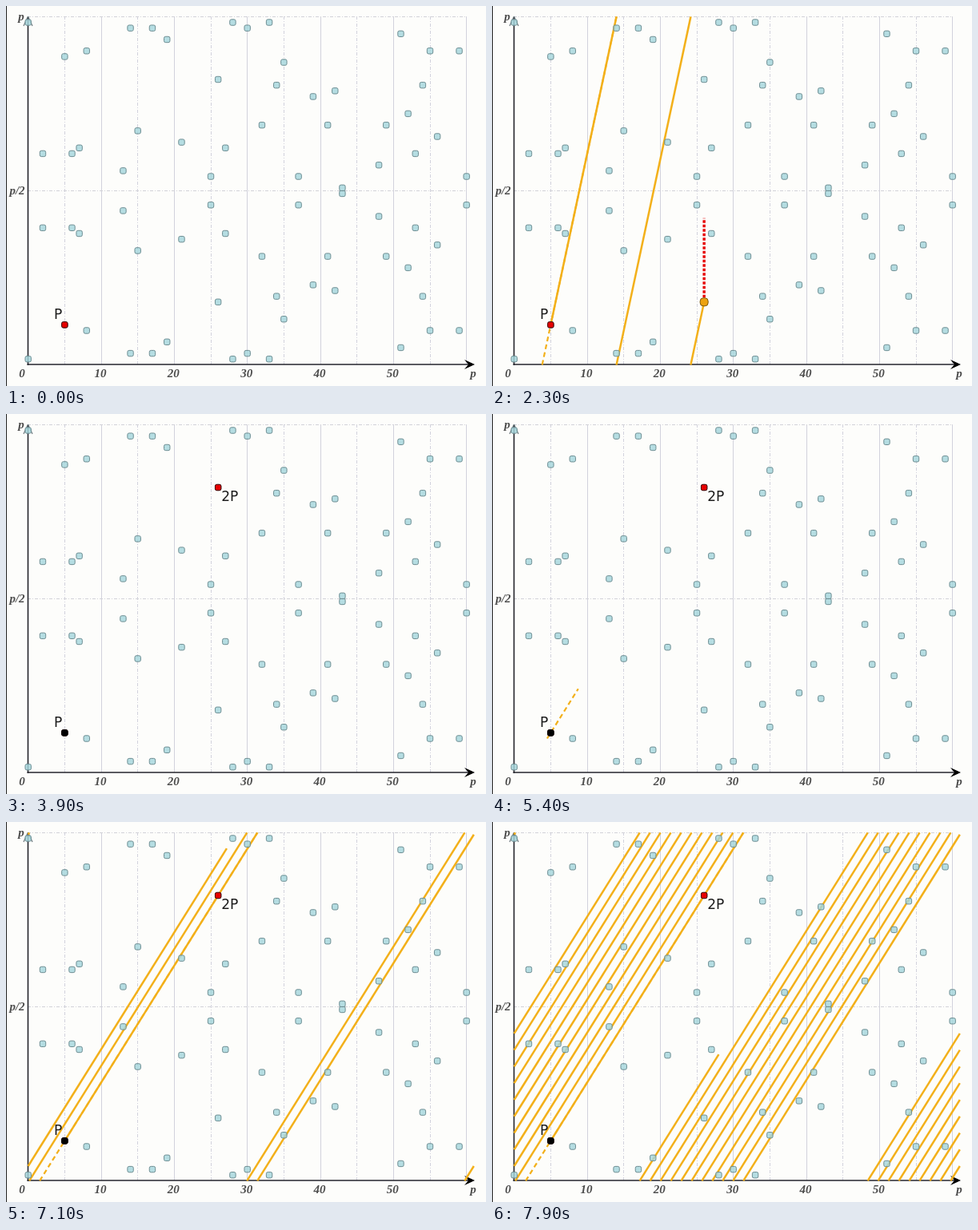
Recreate the animation shown at these times as an HTML page with a canvas. Size 600 px wide and 476 px high, loop 8 s.

```html
<!DOCTYPE html>
<html lang="en">
<head>
<meta charset="utf-8">
<title>Point addition on a curve modulo 61</title>
<style>
  html, body { margin: 0; width: 100%; height: 100%; overflow: hidden; background: #fdfdfb; }
  canvas { display: block; }
</style>
</head>
<body>
<canvas id="stage" width="600" height="476"></canvas>
<script>
const ctx = document.getElementById('stage').getContext('2d');
const MOD = 61, LOOP = 8000;
const ORANGE = '#f3b01a', RED = '#e60000';
const px = x => 27.7 + x * 9.133;
const py = y => 449.4 - y * 7.148;
const clamp = v => Math.max(0, Math.min(1, v));

// Every solution of y² = x³ + 9x + 1 modulo 61.
const points = [];
for (let x = 0; x < MOD; x++)
  for (let y = 0; y < MOD; y++)
    if ((x ** 3 + 9 * x + 1 - y * y) % MOD === 0) points.push([x, y]);

const P = [5, 7], MINUS_2P = [26, 11], TWO_P = [26, 50];
const TANGENT = 6, CHORD = 43 / 21;

function line(x1, y1, x2, y2, color, width, dash = []) {
  ctx.strokeStyle = color;
  ctx.lineWidth = width;
  ctx.setLineDash(dash);
  ctx.beginPath();
  ctx.moveTo(x1, y1);
  ctx.lineTo(x2, y2);
  ctx.stroke();
  ctx.setLineDash([]);
}

// A rounded square marker centred on a curve point.
function marker([x, y], half, corner, fill, stroke, alpha = 1) {
  ctx.globalAlpha = alpha;
  ctx.beginPath();
  ctx.roundRect(px(x) - half, py(y) - half, 2 * half, 2 * half, corner);
  ctx.fillStyle = fill;
  ctx.fill();
  ctx.strokeStyle = stroke;
  ctx.lineWidth = 1;
  ctx.stroke();
  ctx.globalAlpha = 1;
}

function text(str, x, y, font, color, align = 'center') {
  ctx.font = font;
  ctx.textAlign = align;
  ctx.fillStyle = color;
  ctx.fillText(str, x, y);
}

function drawGrid() {
  for (let x = 5; x <= 60; x += 5) {
    const column = Math.floor(px(x)) + 0.5, major = x % 10 === 0;
    line(column, 13, column, 449, '#d2d2dc', 1, major ? [] : [4, 2, 1, 2]);
  }
  for (const y of [13.5, 231.5]) line(27, y, 575.5, y, '#d2d2d8', 1, [4, 2, 1, 2]);
}

function drawAxes() {
  line(0.5, 0, 0.5, 476, '#222', 1);
  line(27.5, 450, 27.5, 14, '#25252c', 1.6);
  line(26.5, 449, 583, 449, '#25252c', 1.6);
  line(27.5, 13, 22, 25, '#69767c', 1.2);
  line(27.5, 13, 33, 25, '#69767c', 1.2);
  ctx.fillStyle = '#000';
  ctx.beginPath();
  ctx.moveTo(586, 449);
  ctx.lineTo(573, 443);
  ctx.lineTo(578, 449);
  ctx.lineTo(573, 455);
  ctx.fill();

  const label = (str, x, y) =>
    text(str, x, y, 'italic bold 15px "Liberation Serif", serif', '#4c4c4c');
  for (let x = 10; x <= 50; x += 10) label(x, px(x) - 1, 464.5);
  label('0', 20, 464.5);
  label('p', 584, 464.5);
  label('p', 19, 17.5);
  label('p/2', 14, 235.5);
}

// Dashed guide growing both ways from P to the lower and upper edges.
function drawGuide(slope, amount) {
  if (amount <= 0) return;
  const down = P[1] * amount, up = (MOD - P[1]) * amount;
  line(px(P[0] - down / slope), py(P[1] - down),
       px(P[0] + up / slope), py(P[1] + up), ORANGE, 2.2, [6, 4]);
}

// Solid line from P that re-enters on the opposite edge.
function drawWrapped(slope, travel) {
  let [x, y] = P;
  while (travel > 1e-6) {
    const toRight = MOD - x, toTop = (MOD - y) / slope;
    const dx = Math.min(travel, toRight, toTop);
    line(px(x), py(y), px(x + dx), py(y + dx * slope), ORANGE, 2.5);
    x = dx === toRight ? 0 : x + dx;
    y = dx === toTop ? 0 : y + dx * slope;
    travel -= dx;
  }
}

function chordTravel(t) {
  if (t < 6300) return 0;
  return t <= 7100 ? 10.9 + (t - 6300) * 0.1666 : 144.2 + (t - 7100) * 0.611;
}

function draw(t) {
  ctx.fillStyle = '#fdfdfb';
  ctx.fillRect(0, 0, 600, 476);
  drawGrid();
  drawAxes();

  const doubling = t < 3900;
  if (doubling) {
    drawGuide(TANGENT, clamp((t - 200) / 500));
    drawWrapped(TANGENT, 21 * clamp((t - 765) / 500));
  } else {
    drawGuide(CHORD, clamp((t - 5300) / 700));
    drawWrapped(CHORD, chordTravel(t));
  }

  for (const point of points) marker(point, 3.7, 2, 'rgba(165,214,220,.82)', '#6d8d92');

  if (doubling && t > 1800) {
    const reach = clamp((t - 1800) / 900) ** 1.66;
    const x = px(MINUS_2P[0]), y = py(MINUS_2P[1]);
    line(x, y, x, y + (py(TWO_P[1]) - y) * reach, RED, 3.4, [3.5, 2]);
  }
  if (doubling && t >= 1300) marker(MINUS_2P, 5, 4, '#eda311', '#7a5608');

  const swap = clamp((t - 2700) / 200);
  const sans = '17px "DejaVu Sans", sans-serif';
  marker(P, 3.7, 2, RED, '#400');
  marker(P, 3.7, 2, '#000', '#000', swap);
  text('P', 60, 392, sans, '#1c1c1c', 'left');
  if (swap > 0) {
    marker(TWO_P, 3.7, 2, RED, '#400', swap);
    ctx.globalAlpha = swap;
    text('2P', 269.3, 109, sans, '#1c1c1c', 'left');
    ctx.globalAlpha = 1;
  }
}

function tick() {
  draw(Math.floor(performance.now() % LOOP / 100) * 100);
  requestAnimationFrame(tick);
}
tick();
</script>
</body>
</html>
```
